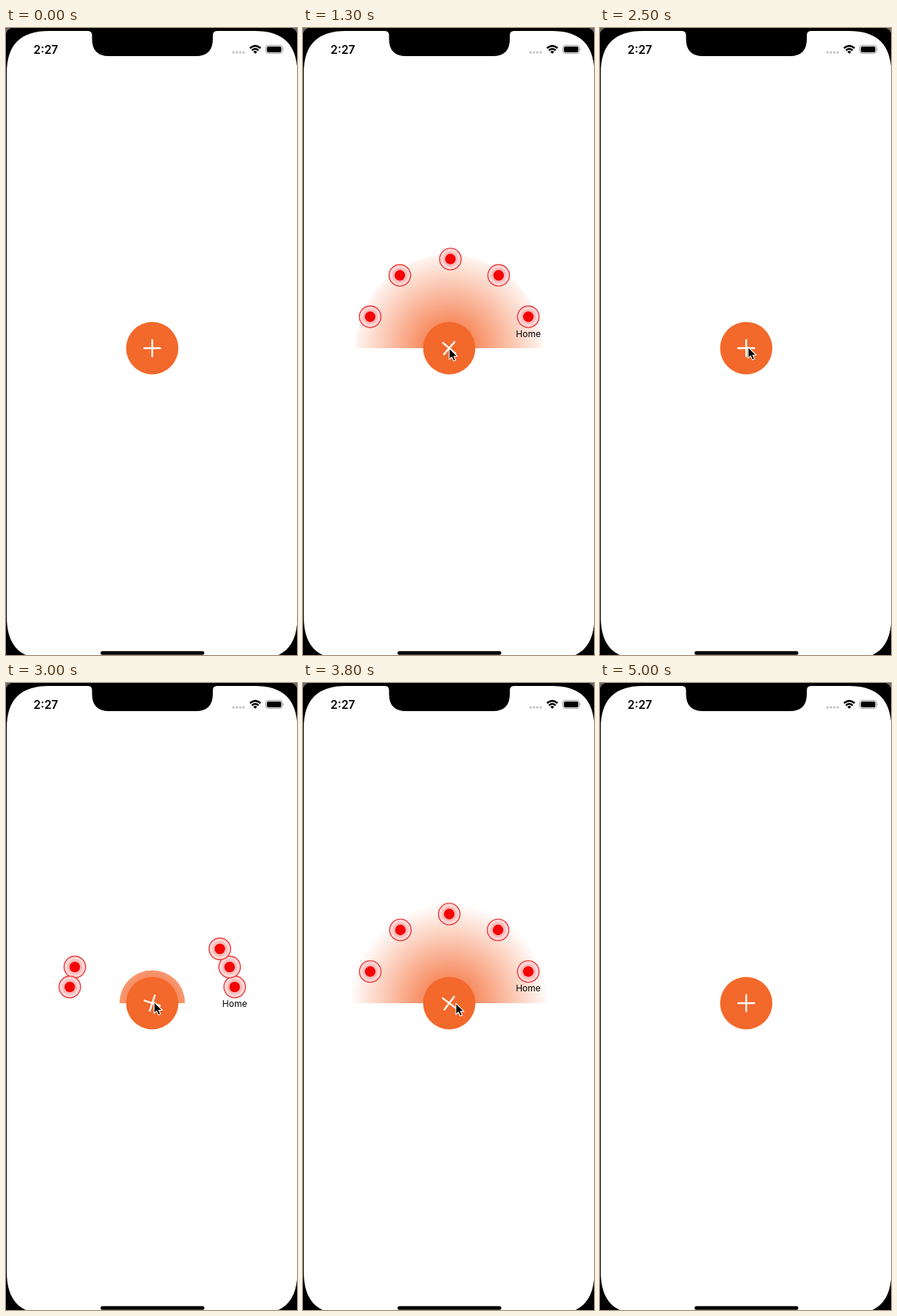
Write an HTML page that moves like this. It is 394 by 848 pixels and loops after 5100 ms.

```html
<!DOCTYPE html>
<html lang="en">
<head>
<meta charset="utf-8">
<title>Radial menu</title>
<style>
  html, body { margin: 0; width: 100%; height: 100%; overflow: hidden; background: #000; }
  svg { display: block; width: 394px; height: 848px; }
  text { font-family: Inter, "Open Sans", sans-serif; }
  .time { font-size: 15.5px; font-weight: 600; }
  .label { font-size: 12px; text-anchor: middle; }
  .plus { stroke: #fff; stroke-width: 2.4; stroke-linecap: round; }
  .wifi { fill: none; stroke: #000; stroke-width: 2.5; }
</style>
</head>
<body>
<svg viewBox="0 0 394 848">
  <defs>
    <radialGradient id="glow" gradientUnits="userSpaceOnUse" cx="0" cy="0" r="135">
      <stop offset="0" stop-color="#f4652b"/>
      <stop offset="1" stop-color="#f4652b" stop-opacity="0"/>
    </radialGradient>
    <g id="target">
      <circle r="14.6" fill="#fcd8d7" stroke="#ea3a3a" stroke-width="1.4"/>
      <circle r="10.5" fill="#fbbcbb"/>
      <circle r="7.2" fill="#f30505"/>
    </g>
  </defs>

  <rect width="394" height="848" fill="#000"/>
  <path d="M0 0H7Q2 2 0 7ZM394 0H387Q392 2 394 7Z" fill="#666"/>
  <path fill="#fff" d="M1 62C1 22 20 4 58 4H111Q116.500 4 116.500 10V15Q116.500 38 139.500 38H257Q280 38 280 15V10Q280 4 285.500 4H337C375 4 394.500 22 394.500 62V796C394.500 836 376 854 337 854H58C20 854 1 836 1 796Z"/>

  <text class="time" x="37.300" y="34.600">2:27</text>
  <g fill="#c4c4c4">
    <circle cx="308" cy="33" r="1.700"/><circle cx="312.600" cy="33" r="1.700"/>
    <circle cx="317.200" cy="33" r="1.700"/><circle cx="321.800" cy="33" r="1.700"/>
  </g>
  <path class="wifi" d="M330.300 27.300Q337.500 21 344.700 27.300M333 30.200Q337.500 26.300 342 30.200"/>
  <path d="M337.500 34.800L334.900 32.200Q337.500 30 340.100 32.200Z"/>
  <rect x="351.600" y="23.500" width="22.800" height="11" rx="3.400" fill="none" stroke="#999"/>
  <rect x="353.200" y="25.100" width="19.600" height="7.800" rx="2"/>
  <path d="M375.500 27.200Q377.300 29 375.500 30.800Z" fill="#999"/>
  <rect x="128" y="842.800" width="140.500" height="5" rx="2.500"/>

  <g transform="translate(198 433)">
    <path id="fan" fill="url(#glow)"/>
    <g id="items"></g>
    <circle r="35.400" fill="#f3682b"/>
    <path id="plus" class="plus" d="M-11 0H11M0 -11V11"/>
  </g>

  <path id="cursor" d="M0 0V15.200L3.500 12L5.900 17.400L8.700 16.200L6.300 11H11Z" fill="#000" stroke="#fff" stroke-width="1.100" stroke-linejoin="round"/>
</svg>
<script>
  const LOOP = 5100, TICK = 100;
  const ARC = 112.5, LIFT = -8, FAN = 135;
  const opens = [1013, 2870], closes = [1711, 3711];
  const waypoints = [[200, 290, 533], [700, 198, 433], [2000, 198, 433],
                     [2400, 200.5, 431.5], [3700, 200.5, 431.5], [4100, 241, 442]];

  const $ = id => document.getElementById(id);
  const fan = $("fan"), plus = $("plus"), cursor = $("cursor"), group = $("items");

  const clamp = u => Math.min(1, Math.max(0, u));
  const linear = u => u;
  const inOut = u => u < 0.5 ? (2 * u) ** 1.65 / 2 : 1 - (2 - 2 * u) ** 1.65 / 2;

  // Each item swings up from the nearer end of the arc.
  const items = [18, 54, 90, 54, 18].map((rise, i) => {
    const node = document.createElementNS("http://www.w3.org/2000/svg", "g");
    node.innerHTML = '<use href="#target"/>' +
      (i === 0 ? '<text class="label" y="27">Home</text>' : "");
    group.append(node);
    return { node, rise, side: i < 3 ? 1 : -1 };
  });

  // Openness from 0 to 1; closing may start late after the tap.
  function openness(t, openTime, delay, closeTime, ease) {
    const cycle = t >= opens[1] ? 1 : 0;
    return ease(clamp((t - opens[cycle]) / openTime)) -
           ease(clamp((t - closes[cycle] - delay) / closeTime));
  }

  function cursorAt(t) {
    const last = waypoints.length - 1;
    const i = Math.max(0, waypoints.findLastIndex(p => p[0] <= t));
    const [t0, x0, y0] = waypoints[i];
    const [t1, x1, y1] = waypoints[Math.min(i + 1, last)];
    const u = t1 > t0 ? inOut(clamp((t - t0) / (t1 - t0))) : 0;
    return [x0 + (x1 - x0) * u, y0 + (y1 - y0) * u];
  }

  function draw(t) {
    const swing = openness(t, 300, 169, 300, inOut);
    const spread = openness(t, 335, 185, 550, inOut);
    const turn = openness(t, 320, 0, 500, linear);

    const r = FAN * spread;
    fan.setAttribute("d", `M${-r} 0A${r} ${r} 0 0 1 ${r} 0Z`);
    plus.setAttribute("transform", `rotate(${45 * turn})`);

    group.style.display = swing > 0.001 ? "" : "none";
    for (const { node, rise, side } of items) {
      const a = rise * swing * Math.PI / 180;
      node.setAttribute("transform",
        `translate(${side * ARC * Math.cos(a)} ${LIFT - ARC * Math.sin(a)})`);
    }

    cursor.style.display = t >= 200 && t < 4200 ? "" : "none";
    cursor.setAttribute("transform", `translate(${cursorAt(t)})`);
  }

  // The picture advances ten times a second.
  const start = performance.now();
  function frame() {
    const t = (performance.now() - start) % LOOP;
    draw(Math.floor(t / TICK) * TICK);
    requestAnimationFrame(frame);
  }
  frame();
</script>
</body>
</html>
```
